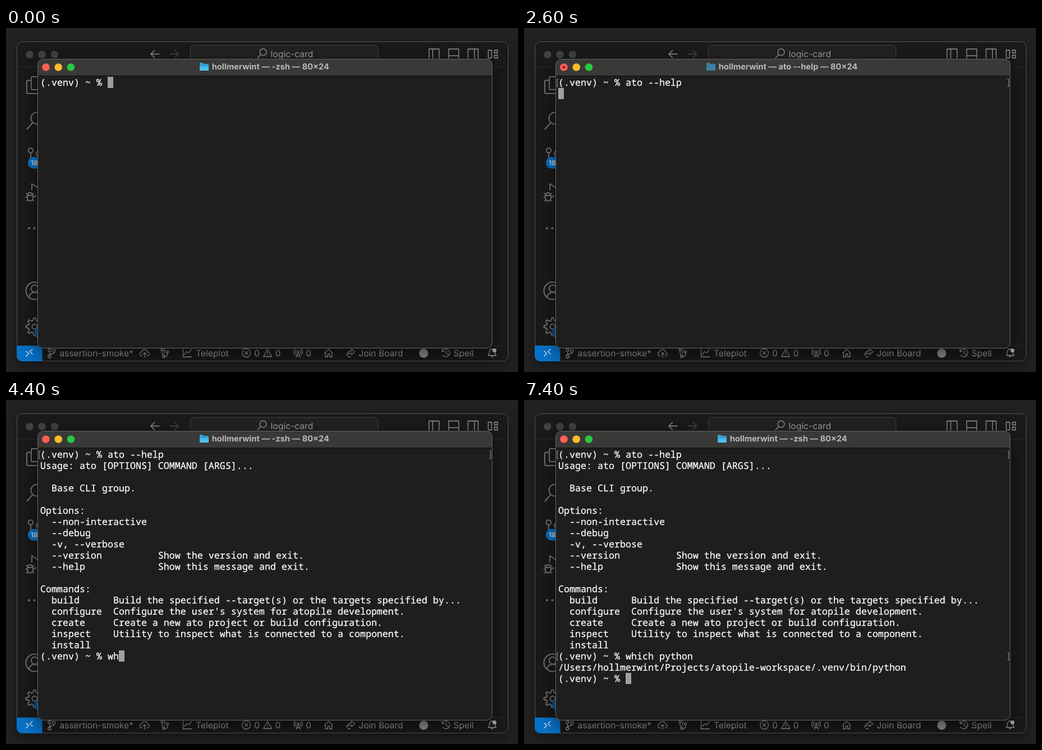
Write an HTML page that moves like this. It is 912 px wide and 614 px high and loops after 8 s.

```html
<!DOCTYPE html>
<html lang="en">
<head>
<meta charset="utf-8">
<title>Terminal session</title>
<style>
  html, body { margin: 0; width: 100%; height: 100%; overflow: hidden; background: #222; }
  svg { display: block; width: 912px; height: 614px; text-rendering: geometricPrecision; }
  text { white-space: pre; }
  .ui { font: 15.6px Inter, sans-serif; fill: #9f9f9f; }
  .icon { fill: none; stroke: #989898; stroke-width: 1.3; stroke-linejoin: round; }
  .activity { stroke: #777; stroke-width: 1.9; }
  .title { font: bold 14.65px Inter, sans-serif; fill: #b9b9b7; }
  #screen { font: 500 16.667px "Noto Sans Mono", monospace; fill: #fff; stroke: #fff; stroke-width: .25; }
  #editor { filter: drop-shadow(0 7px 11px rgba(0, 0, 0, .35)); }
  #shell { filter: drop-shadow(0 11px 16px rgba(0, 0, 0, .55)); }
</style>
</head>
<body>
<svg viewBox="0 0 912 614">
  <defs>
    <linearGradient id="folderFill" x2="0" y2="1">
      <stop offset="0" stop-color="#2d9fd8"/><stop offset="1" stop-color="#54c9f8"/>
    </linearGradient>
    <clipPath id="editorClip"><rect x="19" y="24" width="876" height="571" rx="10"/></clipPath>
  </defs>

  <!-- Editor window behind -->
  <rect id="editor" x="19.5" y="24.5" width="875" height="570" rx="10" fill="#1a1a1a" stroke="#555"/>
  <path d="M20 69.5H894M20 567H894" stroke="#2b2b2b"/>
  <path d="M19 567H64.5V595H19Z" fill="#0872c8" clip-path="url(#editorClip)"/>
  <g fill="#424242">
    <circle cx="42" cy="47.5" r="6.8"/><circle cx="64" cy="47.5" r="6.8"/><circle cx="86.5" cy="47.5" r="6.8"/>
  </g>
  <rect x="328.5" y="31" width="334" height="30" rx="6" fill="#222" stroke="#424242"/>
  <g class="icon">
    <path d="M273.5 46.5H258M265 39.5L258 46.5L265 53.5"/>
    <path d="M292 46.5H307.5M300.5 39.5L307.5 46.5L300.5 53.5" stroke="#4a4a4a"/>
    <circle cx="458" cy="43" r="5.9"/><path d="M453.8 47.2L447.5 54"/>
    <path d="M753.5 37.5H771.5V56H753.5ZM760 37.5V56M788.5 37.5H806.5V56H788.5ZM788.5 49.5H806.5M823 37.5H841V56H823ZM834.5 37.5V56"/>
    <path d="M859 39.5H865V53.5H859ZM870 39.5H875.5V44.5H870ZM870 48.5H875.5V53.5H870Z"/>
  </g>
  <text class="ui" x="471.5" y="51.8">logic-card</text>

  <g class="icon activity">
    <path d="M44 93.5H39Q37 93.5 37 95.5V115Q37 117 39 117H58M60 87H47Q45 87 45 89V108Q45 110 47 110H60"/>
    <circle cx="55" cy="161" r="10.5"/><path d="M47.5 169L37 181"/>
    <circle cx="44" cy="218.5" r="4.2"/><circle cx="58" cy="224" r="4.2"/><path d="M44 223V240"/>
    <path d="M46 290V278L60 287.5M54 300H50"/>
    <path d="M38 299H48V303Q48 308.5 43 308.5Q38 308.5 38 303ZM39 299Q39 294 43 294Q47 294 47 299"/>
    <path d="M36 294.500L39 298M50 294.500L47 298M34.500 302H38M48 302H51.500M36 309.500L39 306.500M50 309.500L47 306.500" stroke-width="1.6"/>
    <circle cx="51" cy="469" r="15.5"/><circle cx="51" cy="465" r="6.2"/><path d="M41 481Q42 472 51 472Q60 472 61 481"/>
    <path id="gear"/><circle cx="51" cy="533" r="4.5"/>
  </g>
  <g fill="#777"><circle cx="41" cy="357.5" r="2"/><circle cx="50.5" cy="357.5" r="2"/></g>
  <rect x="39" y="230" width="25" height="21" rx="10.5" fill="#0872c8"/>
  <text x="44" y="245" font-family="Inter, sans-serif" font-size="12" font-weight="600" fill="#ddd">18</text>
  <circle cx="60" cy="544.5" r="10" fill="#06589e"/>

  <!-- Status bar -->
  <g class="icon">
    <path d="M35.5 576.5L40.5 581L35.5 586M47.5 573L42.5 577.5L47.5 582.5" stroke="#d5e5f3"/>
    <circle cx="77.5" cy="575" r="2.5"/><circle cx="77.5" cy="586.5" r="2.5"/><circle cx="85.5" cy="576.5" r="2.5"/>
    <path d="M77.5 577.5V584M85.5 579Q85.5 581.5 82 581.5Q78 581.5 77.5 584"/>
    <path d="M243 585.5Q238.5 585.5 238.5 581.5Q239 578 242 578Q243 574 247 574Q251 574 252 578Q255 578.5 255 582Q254.500 585.5 251 585.5M247 588V579.5M243.8 582.5L247 579.5L250.2 582.5"/>
    <circle cx="278" cy="574.5" r="2"/><circle cx="287.5" cy="578" r="2"/><circle cx="281" cy="586" r="2"/>
    <path d="M278 576.5V581L281 584M282.5 572V581M287.5 580V583Q287 587 283 586.5"/>
    <path d="M315.5 572.5V587H331M317.5 583L322 577.5L325.5 580L330.5 573.5"/>
    <circle cx="428" cy="580" r="7.5"/><path d="M425 577L431 583M431 577L425 583"/>
    <path d="M466 573L473.5 586.5H458.5ZM466 577.5V582M466 583.5V585"/>
    <circle cx="520.5" cy="578" r="1.5"/>
    <path d="M520 580L516.5 588M521 580L524.5 588M518 585H523M517 582Q514.5 578 517 574M524 582Q526.5 578 524 574M514.5 584Q511 578 514.5 572.5M526.5 584Q530 578 526.5 572.5"/>
    <path d="M567 580.5L574.5 573.5L582 580.5M569 579V587H573V582H576.5V587H580.5V579"/>
    <path d="M615.5 573L621.5 578L615.5 583V580.5Q610 580 607 584Q608 576.5 615.5 576ZM609 586Q611 588 613.5 586"/>
    <path d="M777 577A7 7 0 1 1 777.5 583.5M776.5 573V577.5H781M784 575.5V580.5L788 583"/>
    <path d="M859 584.5Q861 582.5 861 578Q861.5 573 866 573Q871 573 871 580L873 584.5ZM864 585Q866 589 868 585"/>
  </g>
  <circle cx="744" cy="580.5" r="8" fill="#949494"/>
  <circle cx="870" cy="575.5" r="3.5" fill="#b0b0b0"/>
  <g class="ui">
    <text x="95.5" y="586">assertion-smoke*</text>
    <text x="338" y="586">Teleplot</text>
    <text x="442" y="586">0</text><text x="479.5" y="586">0</text><text x="534" y="586">0</text>
    <text x="628" y="586">Join Board</text>
    <text x="797" y="586">Spell</text>
  </g>

  <!-- Terminal window -->
  <rect id="shell" x="56" y="54.5" width="810.5" height="517.5" rx="10.5" fill="#0a0a0a"/>
  <rect x="56.5" y="55.5" width="809.5" height="516" rx="10" fill="#1e1e1e"/>
  <path d="M57 85V65Q57 56 66 56H857Q866 56 866 65V85Z" fill="#393937"/>
  <path d="M57 85.5H866" stroke="#0c0c0c"/>
  <rect x="56.5" y="55.5" width="809.5" height="516" rx="10" fill="none" stroke="#666"/>
  <circle cx="71" cy="70" r="6.8" fill="#ff5f57"/>
  <circle cx="93.3" cy="70" r="6.8" fill="#febc2e"/>
  <circle cx="115.5" cy="70" r="6.8" fill="#28c840"/>
  <circle id="busyDot" cx="71" cy="70" r="2.3" fill="#8a130e"/>
  <g id="heading">
    <path id="folder" d="M0 1.5Q0 0 1.5 0H5L7 2H14.5Q16 2 16 3.5V12.5Q16 14 14.5 14H1.5Q0 14 0 12.5Z"/>
    <path d="M0 4.3H16" stroke="#1c7cae" stroke-width=".8"/>
    <text id="caption" class="title" x="21.7" y="12.4"></text>
  </g>
  <rect id="cursor" width="10" height="20" fill="#a0a0a0"/>
  <g id="screen"></g>
  <g id="marks" fill="none" stroke="#8c8c8c" stroke-width="1.2"></g>
</svg>
<script>
const $ = id => document.getElementById(id);
const LOOP = 8000, LEFT = 61, TOP = 87, CELL = 10, ROW = 20;
const USER = "hollmerwint", PROMPT = "(.venv) ~ % ";
const HELP = `Usage: ato [OPTIONS] COMMAND [ARGS]...

  Base CLI group.

Options:
  --non-interactive
  --debug
  -v, --verbose
  --version          Show the version and exit.
  --help             Show this message and exit.

Commands:
  build      Build the specified --target(s) or the targets specified by...
  configure  Configure the user's system for atopile development.
  create     Create a new ato project or build configuration.
  inspect    Utility to inspect what is connected to a component.
  install`.split("\n");

// Each key is [time, number of characters typed so far].
const helpCommand = { text: "ato --help", keys: [[1000, 1], [1200, 2], [1400, 4], [1600, 6], [1800, 7], [2000, 10]] };
const whichCommand = { text: "which python", keys: [[4400, 2], [4600, 4], [4800, 6], [5000, 7], [5200, 9], [5400, 10], [5800, 11], [6000, 12]] };

function typed({ text, keys }, time) {
  const key = keys.findLast(([start]) => start <= time);
  return PROMPT + text.slice(0, key ? key[1] : 0);
}

function screenLines(time) {
  const lines = [typed(helpCommand, time)];
  if (time >= 2400 && time < 3000) lines.push("");
  if (time >= 3000) lines.push(...HELP, typed(whichCommand, time));
  if (time >= 7400) lines.push(`/Users/${USER}/Projects/atopile-workspace/.venv/bin/python`, PROMPT);
  return lines;
}

function bracketPair(row) {
  const y = TOP + 4.5 + row * ROW;
  return `M61.5 ${y}H59V${y + 13}H61.5M861 ${y}H863.5V${y + 13}H861`;
}

// Eight teeth, each made of two outer and two inner corners.
function gearPath(cx, cy) {
  const points = [];
  for (let i = 0; i < 32; i++) {
    const angle = (i - 0.5) * Math.PI / 16;
    const radius = i % 4 < 2 ? 15.5 : 11;
    points.push(`${cx + radius * Math.cos(angle)} ${cy + radius * Math.sin(angle)}`);
  }
  return `M${points.join("L")}Z`;
}

function makeSvg(tag, attributes, parent) {
  const node = document.createElementNS("http://www.w3.org/2000/svg", tag);
  for (const name in attributes) node.setAttribute(name, attributes[name]);
  return parent.appendChild(node);
}

const rows = Array.from({ length: 24 }, (_, i) =>
  makeSvg("text", { x: LEFT, y: TOP + 16.3 + i * ROW }, $("screen")));
const marks = [[2400, 0], [7400, 18]].map(([start, row]) =>
  ({ start, node: makeSvg("path", { d: bracketPair(row) }, $("marks")) }));
$("gear").setAttribute("d", gearPath(51, 533));

function setText(node, text) {
  if (node.textContent !== text) node.textContent = text;
}

function show(node, visible) {
  node.setAttribute("visibility", visible ? "visible" : "hidden");
}

function draw(now) {
  const time = now % LOOP;
  const lines = screenLines(time);
  const last = lines.length - 1;
  rows.forEach((row, i) => setText(row, lines[i] ?? ""));
  $("cursor").setAttribute("x", LEFT + lines[last].length * CELL);
  $("cursor").setAttribute("y", TOP + last * ROW);
  marks.forEach(({ start, node }) => show(node, time >= start));

  const busy = time >= 2600 && time < 3200;
  show($("busyDot"), busy);
  setText($("caption"), `${USER} — ${busy ? "ato --help" : "-zsh"} — 80×24`);
  $("heading").setAttribute("transform", `translate(${busy ? 325 : 345} 62)`);
  $("folder").setAttribute("fill", busy ? "#3d7f9e" : "url(#folderFill)");
  requestAnimationFrame(draw);
}
draw(0);
</script>
</body>
</html>
```
